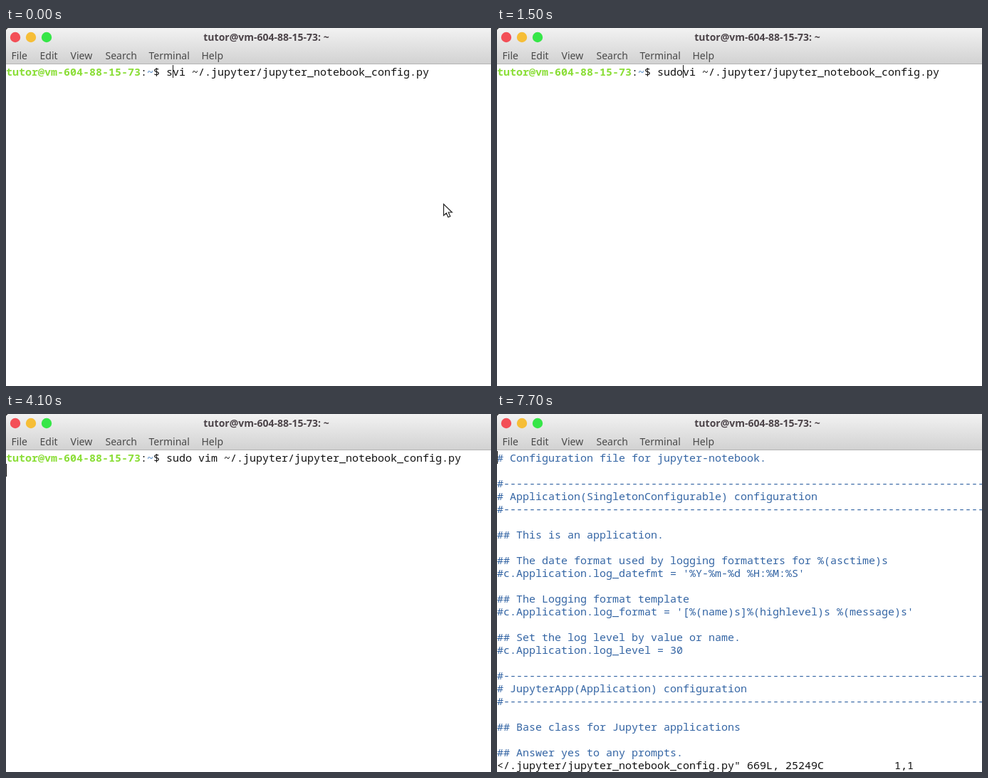
An HTML page for the animation above (8000 ms loop, 681 px wide and 503 px high).

```html
<!DOCTYPE html>
<html lang="en">
<head>
<meta charset="utf-8">
<title>Terminal</title>
<style>
  html, body { margin: 0; width: 681px; height: 503px; overflow: hidden; background: #fff; }
  svg { position: absolute; left: 0; top: 0; }
  svg text { font: 14px "Noto Sans", sans-serif; fill: #4a4a4a; }
  svg .title { font-weight: 700; fill: #4c4449; text-anchor: middle; }
  #screen {
    position: absolute; left: 0; top: 52px; width: 681px; height: 451px; margin: 0;
    overflow: hidden; white-space: pre; color: #111;
    font: 15px/18px "Noto Sans Mono", monospace; font-variant-ligatures: none;
  }
  #screen b { color: #8bde38; }
  #screen i { color: #6595cb; font-style: normal; font-weight: 700; }
  #screen span { color: #3465a4; }
  #cursor { position: absolute; width: 1px; height: 18px; background: #111; }
</style>
</head>
<body>
<pre id="screen"></pre>
<div id="cursor"></div>
<svg width="681" height="503">
  <defs>
    <linearGradient id="bar" x2="0" y2="1">
      <stop stop-color="#f2f2f2"/>
      <stop offset="1" stop-color="#d2d2d2"/>
    </linearGradient>
  </defs>
  <rect width="681" height="50" fill="url(#bar)"/>
  <rect y="50" width="681" height="1" fill="#b4b4b4"/>
  <path d="M0 0H3Q1 1 0 3Z" fill="#333"/>
  <circle cx="13" cy="13" r="7.2" fill="#f34f57"/>
  <circle cx="35" cy="13" r="7.2" fill="#f6be37"/>
  <circle cx="57" cy="13" r="7.2" fill="#36e648"/>
  <text class="title" id="title" x="365.5" y="18"></text>
  <g id="menu"></g>
  <path id="pointer" fill="#fff" stroke="#222" stroke-width="1.2"
    d="M614.5 247.5V263.5L618.3 260L620.8 265.8L623.8 264.6L621.2 259H626.3Z"/>
</svg>
<script>
const LOOP = 8000, CELL = 9, ROW = 18, TOP = 52;
const user = 'tutor', host = 'vm-604-88-15-73';
const $ = id => document.getElementById(id);
const terminal = $('screen'), cursor = $('cursor'), pointer = $('pointer');

$('title').textContent = `${user}@${host}: ~`;
$('menu').innerHTML = [['File', 7], ['Edit', 47], ['View', 90], ['Search', 139], ['Terminal', 200], ['Help', 274]]
  .map(([name, x]) => `<text x="${x + 0.5}" y="44">${name}</text>`).join('');

const shell = cmd =>
  `<b>${user}@${host}</b>:<i>~</i>$ ${cmd} ~/.jupyter/jupyter_notebook_config.py\n`;
const ask = shell('sudo vim') + `[sudo] password for ${user}: `;
const rule = '#' + '-'.repeat(75);

const editor = `<span># Configuration file for jupyter-notebook.

${rule}
# Application(SingletonConfigurable) configuration
${rule}

## This is an application.

## The date format used by logging formatters for %(asctime)s
#c.Application.log_datefmt = '%Y-%m-%d %H:%M:%S'

## The Logging format template
#c.Application.log_format = '[%(name)s]%(highlevel)s %(message)s'

## Set the log level by value or name.
#c.Application.log_level = 30

${rule}
# JupyterApp(Application) configuration
${rule}

## Base class for Jupyter applications

## Answer yes to any prompts.</span>
${'&lt;/.jupyter/jupyter_notebook_config.py" 669L, 25249C' + ' '.repeat(11)}1,1`;

// time, screen content, cursor column, cursor row, cursor visible
const steps = [
  [0, shell('svi'), 26, 0, 1],
  [100, shell('suvi'), 27, 0, 1],
  [600, shell('suvi'), 27, 0, 0],
  [800, shell('suvi'), 27, 0, 1],
  [1000, shell('sudvi'), 28, 0, 1],
  [1500, shell('sudovi'), 29, 0, 1],
  [2000, shell('sudo vi'), 30, 0, 1],
  [2100, shell('sudo vi'), 31, 0, 1],
  [2300, shell('sudo vi'), 32, 0, 1],
  [2700, shell('sudo vi'), 32, 0, 0],
  [2900, shell('sudo vi'), 32, 0, 1],
  [3100, shell('sudo vim'), 33, 0, 1],
  [4100, shell('sudo vim'), 0, 1, 1],
  [4400, ask, 27, 1, 1],
  [4500, ask, 27, 1, 0],
  [5100, ask, 27, 1, 1],
  [7000, editor, 0, 0, 1],
  [7100, editor, 0, 0, 0],
  [7700, editor, 0, 0, 1]
];

let shown = null;
function draw(now) {
  const t = now % LOOP;
  const [, content, col, row, on] = steps.findLast(s => s[0] <= t);
  if (content !== shown) terminal.innerHTML = shown = content;
  cursor.style.left = col * CELL + 'px';
  cursor.style.top = TOP + row * ROW + 'px';
  cursor.style.visibility = on ? 'visible' : 'hidden';
  pointer.style.visibility = t < 200 ? 'visible' : 'hidden';
}

const start = performance.now();
function tick() {
  draw(performance.now() - start);
  requestAnimationFrame(tick);
}
tick();
</script>
</body>
</html>
```
